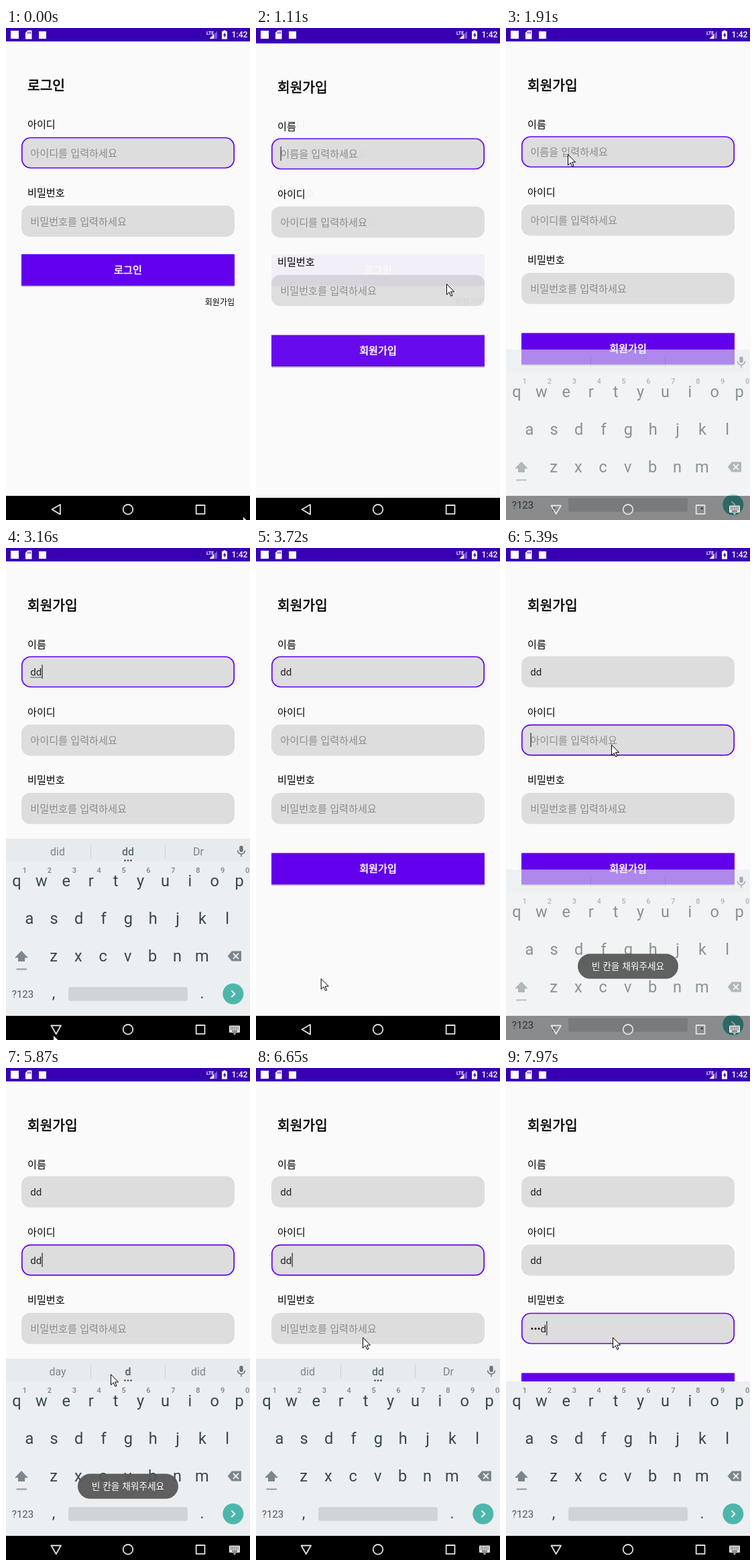
An HTML page that plays this animation: 364x733 px, repeating every 8 s.

```html
<!DOCTYPE html>
<html lang="ko">
<head>
<meta charset="utf-8">
<style>
html, body { margin: 0; width: 100%; height: 100%; overflow: hidden; background: #fafafa; }
svg { display: block; font-family: Roboto, "Noto Sans CJK KR", "Noto Sans CJK JP", "Noto Sans CJK", sans-serif; }
.ko { font-family: "Noto Sans CJK KR", "Noto Sans CJK JP", "Noto Sans CJK", sans-serif; }
.bold { stroke: currentColor; stroke-width: .55; }
</style>
</head>
<body>
<svg id="stage" width="364" height="733" viewBox="0 0 364 733"></svg>
<script>
const LOOP = 8000, FIRST = 70, STEP = 79;
const PURPLE = '#6200ee', SIZE = 15.15;
const stage = document.getElementById('stage');

const rect = (x, y, w, h, fill, extra = '') =>
  `<rect x="${x}" y="${y}" width="${w}" height="${h}" fill="${fill}" ${extra}/>`;
const path = (d, extra) => `<path d="${d}" ${extra}/>`;
const text = (str, x, y, size, fill, extra = '') =>
  `<text x="${x}" y="${y}" font-size="${size}" fill="${fill}" ${extra}>${str}</text>`;
const ko = (str, x, y, size, fill, extra = '') => text(str, x, y, size, fill, 'class="ko" ' + extra);
const boldKo = (str, x, y, size, color, extra = '') =>
  text(str, x, y, size, color, `class="ko bold" color="${color}" ${extra}`);
const group = (inner, dy, opacity) => `<g transform="translate(0 ${dy})" opacity="${opacity}">${inner}</g>`;
const within = (s, ...spans) => spans.some(([a, b]) => s >= a && s < b);
const MID = 'text-anchor="middle"';

// Pointer stops: step, x, y
const stops = [
  [-1, 353, 727], [3, 308, 403], [6, 308, 403], [13, 284, 381], [15, 284, 381],
  [21, 92, 188], [27, 92, 188], [33, 72, 715], [38, 72, 715], [39, 70, 725],
  [40, 71, 718], [43, 71, 718], [51, 152, 475], [56, 152, 475], [61, 157, 283],
  [66, 157, 283], [73, 156, 456], [74, 160, 419], [75, 160, 408], [76, 160, 408], [77, 159, 401]
];

function pointer(s) {
  const i = stops.findIndex(p => p[0] >= s);
  let [, x, y] = i < 0 ? stops[stops.length - 1] : stops[i];
  if (i > 0) {
    const [s0, x0, y0] = stops[i - 1];
    const p = (s - s0) / (stops[i][0] - s0), e = p * p * (3 - 2 * p);
    x = x0 + (x - x0) * e;
    y = y0 + (y - y0) * e;
  }
  return path('M.5 .5V16.2L4.2 12.7L6.8 18.4L9 17.4L6.5 11.9H11.6Z',
    `transform="translate(${x} ${y})" fill="#fff" stroke="#000"`);
}

function field(top, hint, value, focused, caret, underline) {
  const width = [...value].reduce((w, c) => w + (c === '•' ? 5.1 : 8.5), 0);
  let out = focused
    ? rect(23.8, top + .8, 316.4, 45, '#ddd', `rx="13" stroke="${PURPLE}" stroke-width="1.7"`)
    : rect(23, top, 318, 46.5, '#ddd', 'rx="13"');
  out += value ? text(value, 36.3, top + 29, SIZE, '#212121') : ko(hint, 36.3, top + 29, SIZE, '#8c8c8c');
  if (underline) out += rect(36.5, top + 31, width, 1, '#555');
  if (focused && caret) out += rect(36.4 + width, top + 12.5, 1.4, 21, '#444');
  return out;
}

const button = (top, label) =>
  rect(23, top + 2, 318, 47, '#000', 'opacity=".12" rx="1"') +
  rect(23, top + 1, 318, 47, '#000', 'opacity=".2" rx="1"') +
  rect(23, top, 318, 46.8, PURPLE) +
  boldKo(label, 182, top + 29, SIZE, '#fff', MID);

const screen = (title, body) =>
  rect(0, 0, 364, 733, '#fafafa') + rect(0, 0, 364, 20, '#3700b3') + rect(0, 697, 364, 60, '#000') +
  boldKo(title, 32, 92.5, 20.3, '#000') + body;

const label = (str, y) => ko(str, 32, y, SIZE, '#000');

const login = s => screen('로그인',
  label('아이디', 149) + field(162.7, '아이디를 입력하세요', '', true, within(s, [0, 6])) +
  label('비밀번호', 250.5) + field(264.6, '비밀번호를 입력하세요', '', false) +
  button(337, '로그인') + ko('회원가입', 341, 413, 12, '#000', 'text-anchor="end"'));

function signup(s) {
  const focus = s < 65 ? 0 : s < 85 ? 1 : 2;
  const name = s < 27 ? '' : s < 28 ? 'd' : 'dd';
  const id = s < 70 ? '' : s < 72 ? 'd' : 'dd';
  const typed = s < 94 ? 0 : 1 + Math.floor((s - 94) / 2);
  const secret = typed ? '•'.repeat(typed - 1) + 'd' : '';
  const caret = within(s, [11, 19], [25, 33], [39, 46], [58, 78], [83, 91], [94, 101]);
  return screen('회원가입',
    label('이름', 149) + field(161.2, '이름을 입력하세요', name, focus === 0, caret, within(s, [27, 43])) +
    label('아이디', 249.5) + field(262.9, '아이디를 입력하세요', id, focus === 1, caret) +
    label('비밀번호', 351) + field(364.7, '비밀번호를 입력하세요', secret, focus === 2, caret) +
    button(454.4, '회원가입'));
}

const keyRow = (letters, x, y) =>
  [...letters].map((c, i) => text(c, x + i * 36.9, y, 23.6, '#37474f', MID)).join('');

const keys =
  rect(0, 467, 364, 230, '#eceff1') +
  keyRow('qwertyuiop', 16, 503.7) + keyRow('asdfghjkl', 34.8, 559.8) + keyRow('zxcvbnm', 71, 616) +
  [...'1234567890'].map((c, i) => text(c, 28 + i * 36.9, 484, 11, '#7b8488', MID + ' font-weight="500"')).join('') +
  path('M23 600L33 610.5H28V616H18V610.5H13Z', 'fill="#7b878c"') + rect(15.5, 626.5, 15.5, 2, '#8f999d') +
  path('M337 600.5H351V615.5H337L330.5 608Z', 'fill="#7b878c"') +
  path('M339 604L347 612M347 604L339 612', 'stroke="#eceff1" stroke-width="1.8"') +
  text('?123', 25, 670, 15, '#455a64', MID) +
  text(',', 71, 671, 23, '#37474f', MID) + text('.', 292.5, 671, 23, '#37474f', MID) +
  rect(93, 654.3, 178, 20.5, '#cfd4d7', 'rx="3"') +
  '<circle cx="338.8" cy="664.3" r="15.5" fill="#4db6ac"/>' +
  path('M336.5 659.5L341.3 664.3L336.5 669', 'fill="none" stroke="#fff" stroke-width="1.8"');

function strip(s) {
  const words = within(s, [29, 43], [74, 85]) ? ['did', 'dd', 'Dr'] : within(s, [71, 74]) ? ['day', 'd', 'did'] : [];
  let out = rect(0, 433, 364, 35, '#e7ebee') + rect(0, 467, 364, 1, '#f4f6f7') +
    rect(126, 442, 1, 20, '#cbd1d4') + rect(237, 442, 1, 20, '#cbd1d4') +
    rect(348.3, 443.5, 5.4, 9.5, '#6b777d', 'rx="2.7"') +
    path('M345.5 450.5a5.5 5.5 0 0 0 11 0M351 456V460', 'fill="none" stroke="#6b777d" stroke-width="1.5"');
  words.forEach((w, i) => {
    const strong = i === 1;
    out += text(w, 77 + i * 105, 458, 16, strong ? '#5f6d74' : '#7a868c', `${MID} font-weight="${strong ? (w === 'd' ? 700 : 500) : 400}"`);
  });
  if (words.length) out += [177.5, 182, 186.5].map(x => `<circle cx="${x}" cy="465.5" r="1.3" fill="#37474f"/>`).join('');
  return out;
}

function keyboard(s) {
  const ramp = n => n <= 0 ? 0 : Math.min(1, .58 * n ** .7);
  const shown = s < 66 ? ramp(s - 22) - ramp(s - 43) : ramp(s - 66);
  return shown > 0 ? group((s < 85 ? strip(s) : '') + keys, Math.round(110 * (1 - shown)), shown) : '';
}

function toast(s) {
  const alpha = Math.max(0, Math.min(.93, .5 + (s - 53) * .165, (83 - s) * .2));
  if (s < 53 || !alpha) return '';
  return group(rect(107, 604.5, 150, 37.3, '#555', 'rx="18.6"') +
    ko('빈 칸을 채워주세요', 182, 628, 13.7, '#fff', MID), 0, alpha);
}

const status =
  rect(7, 4, 12, 12, '#fff') +
  path('M32.5 3.5H38.5V16.5H29V7Z', 'fill="#fff"') + path('M32.5 6V8.5M34.5 5.5V8.5M36.5 5.5V8.5', 'stroke="#3700b3"') +
  rect(49, 5, 11, 11, '#fff') +
  text('LTE', 299, 9.5, 6.8, '#fff', 'font-weight="700" textLength="10" lengthAdjust="spacing"'.replace(/ text.*/, '')) +
  path('M315 4.5V16H303.5Z', 'fill="#fff" opacity=".35"') + path('M310 9.5V16H303.5Z', 'fill="#fff"') +
  path('M324.2 3.5H327.8V4.8H330V16.5H322V4.8H324.2Z', 'fill="#fff"') +
  path('M327 6.5L323.8 11.2H325.6V14.8L328.6 9.8H327Z', 'fill="#3700b3"') +
  text('1:42', 336.5, 14.3, 12.2, '#fff', 'font-weight="500"');

function navigation(s) {
  const open = within(s, [22, 43], [66, 101]);
  const line = 'fill="none" stroke="#e2e2e2" stroke-width="1.8" stroke-linejoin="round"';
  let out = path(open ? 'M67.5 711.5H82L74.7 724Z' : 'M68.5 717.3L81 710V724.6Z', line) +
    `<circle cx="182" cy="717.3" r="7.3" ${line}/>` + `<rect x="283.7" y="711" width="12.8" height="12.8" ${line}/>`;
  if (open) {
    out += rect(333, 711.5, 16, 10.5, '#e2e2e2', 'rx="1"') +
      path('M335 714.2H347M335 716.7H347', 'stroke="#222" stroke-width="1.3" stroke-dasharray="1.4 1.2"') +
      path('M337 719.7H345', 'stroke="#222" stroke-width="1.2"') + path('M338.5 723H343.5L341 725.3Z', 'fill="#e2e2e2"');
  }
  return out;
}

// The new screen slides up over the old one
function app(s) {
  const p = Math.min(1, (s - 11) * STEP / 350);
  if (p <= 0) return login(s);
  const fade = Math.min(1, p * 1.75), page = signup(s);
  return p < 1 ? login(s) + group(page, Math.round(58 * (1 - p) ** 5), 1 - (1 - fade) ** 2) : page;
}

let last = null;
function frame() {
  const s = Math.floor((performance.now() % LOOP - FIRST) / STEP);
  if (s !== last) {
    last = s;
    stage.innerHTML = app(s) + keyboard(s) + status + navigation(s) + toast(s) + pointer(s);
  }
  requestAnimationFrame(frame);
}
frame();
</script>
</body>
</html>
```
